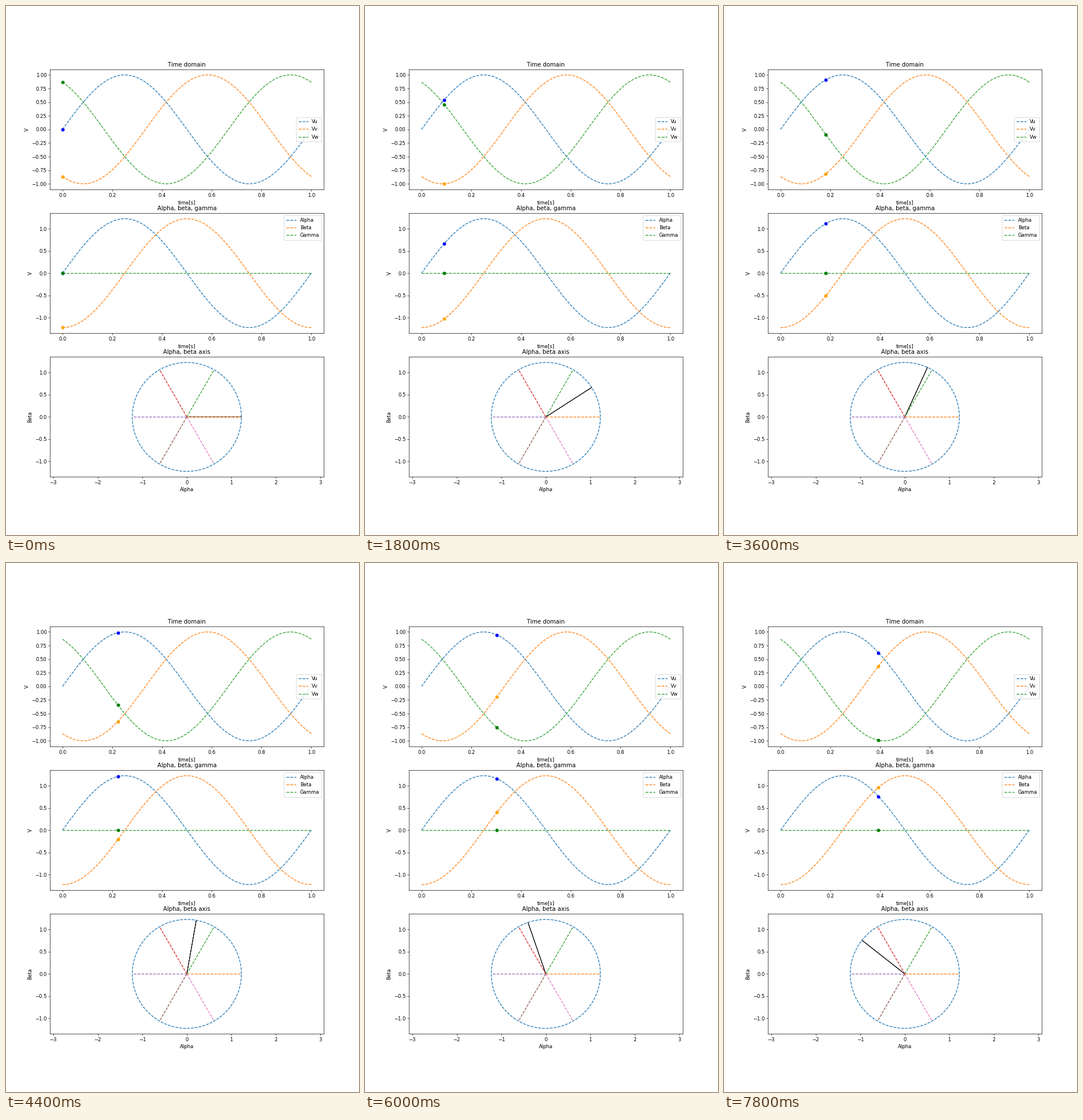
Recreate the animation shown at these times as a matplotlib script. Size 611x917 px, loop 8000 ms.

```python
import numpy as np
import matplotlib.pyplot as plt
from matplotlib.animation import FuncAnimation

DPI = 61.1
FRAMES, INTERVAL = 40, 200
COLORS = ("blue", "orange", "green")

# Balanced three-phase voltages and their power-invariant Clarke transform
t = np.linspace(0, 1, 100)
shift = 2 * np.pi / 3
phases = [np.sin(2 * np.pi * t + k * shift) for k in (0, -1, 1)]
amp = np.sqrt(1.5)
clarke = [amp * np.sin(2 * np.pi * t), -amp * np.cos(2 * np.pi * t), 0 * t]

fig, (ax_time, ax_clarke, ax_plane) = plt.subplots(
    3, 1, figsize=(611.01 / DPI, 917.01 / DPI), dpi=DPI)


def plot_waves(ax, waves, names, title, loc):
    """Draw dashed curves with a legend and return one marker per curve."""
    for wave, name in zip(waves, names):
        ax.plot(t, wave, "--", label=name)
    ax.set(title=title, xlabel="time[s]", ylabel="V")
    ax.legend(loc=loc)
    return [ax.plot(t[:1], wave[:1], "o", color=color)[0]
            for wave, color in zip(waves, COLORS)]


dots = plot_waves(ax_time, phases, ("Vu", "Vv", "Vw"),
                  "Time domain", "center right")
dots += plot_waves(ax_clarke, clarke, ("Alpha", "Beta", "Gamma"),
                   "Alpha, beta, gamma", "upper right")

ax_plane.plot(amp * np.cos(2 * np.pi * t), amp * np.sin(2 * np.pi * t), "--")
for angle in np.arange(6) * np.pi / 3:
    ax_plane.plot([0, amp * np.cos(angle)], [0, amp * np.sin(angle)], "--")
ax_plane.set(title="Alpha, beta axis", xlabel="Alpha", ylabel="Beta")
ax_plane.axis("equal")
vector = ax_plane.arrow(0, 0, amp, 0, color="black")


def update(i):
    for dot, wave in zip(dots, phases + clarke):
        dot.set_data([t[i]], [wave[i]])
    vector.set_data(dx=-clarke[1][i], dy=clarke[0][i])
    return [*dots, vector]


anim = FuncAnimation(fig, update, frames=FRAMES, interval=INTERVAL,
                     repeat=True, repeat_delay=0)
plt.show()
```
